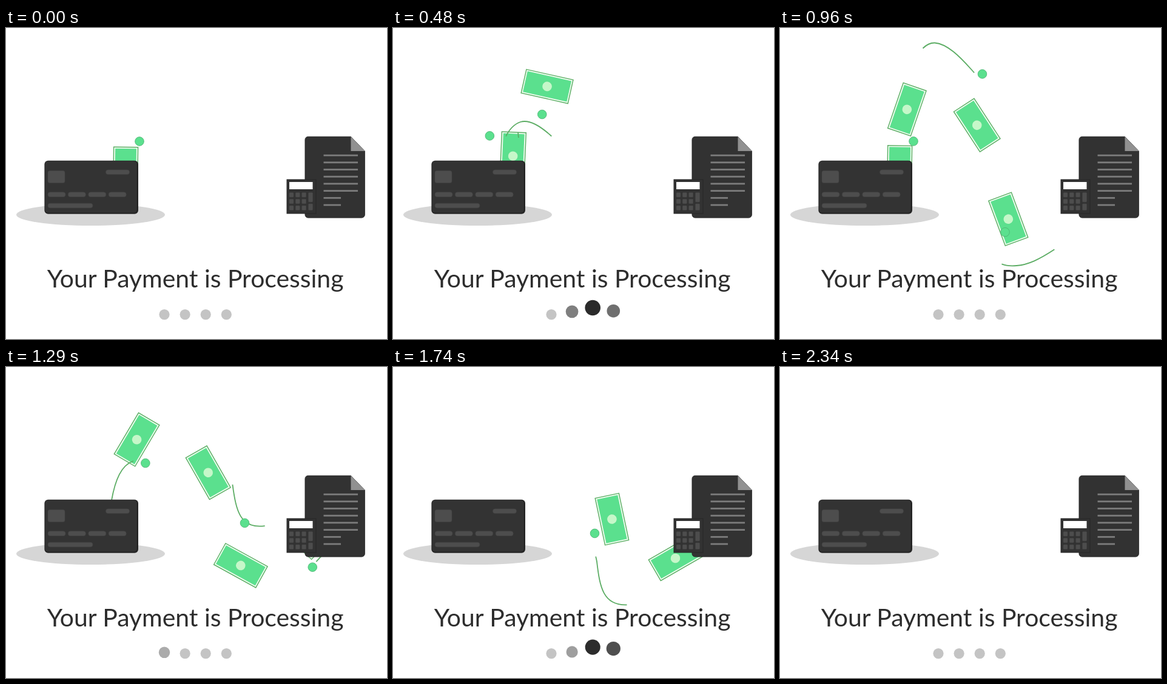
An HTML page for the animation above (2.46 s loop, 628 px wide and 513 px high).

```html
<!DOCTYPE html>
<html lang="en">
<head>
<meta charset="utf-8">
<title>Payment processing</title>
<style>
  html, body { margin: 0; width: 100%; height: 100%; overflow: hidden; background: #fff; }
  svg { display: block; width: 628px; height: 513px; }
  text { font: 40.9px Lato, sans-serif; fill: #2d2d2d; text-anchor: middle; }
  .trail { fill: none; stroke: #5bac63; stroke-width: 1.8; }
  .coin { fill: #5be08e; stroke: #4fb574; stroke-width: .9; }
  .panel { fill: #323232; stroke: #272727; }
  .mark { fill: #4d4d4d; stroke: #444; stroke-width: .6; }
</style>
</head>
<body>
<svg viewBox="0 0 628 513">
  <ellipse cx="139.5" cy="308" rx="122.5" ry="18" fill="#d6d6d6"/>
  <g id="bills"></g>
  <g id="trails"></g>
  <g id="coins"></g>

  <g id="card">
    <rect x="63.4" y="218.8" width="154.6" height="88" rx="6" fill="#262626"/>
    <rect x="64.5" y="219.6" width="151" height="85" rx="5" fill="#333"/>
  </g>

  <g id="paper">
    <path class="panel" d="M498 179.3H568.5L591.3 203V308a5 5 0 0 1-5 5H498a5 5 0 0 1-5-5V184.300a5 5 0 0 1 5-5Z"/>
    <path d="M568.5 179.300V203H591.800Z" fill="#919191"/>
  </g>

  <g id="calc">
    <rect class="panel" x="463" y="250" width="48" height="56"/>
    <rect x="467" y="254" width="38.500" height="12" fill="#fff"/>
  </g>

  <text x="312.1" y="428">Your Payment is Processing</text>
  <g id="dots"></g>
</svg>
<script>
const LOOP = 2460, LAST = 2340, STEP = 30;
const TRIP = 1440, LAG = 150;
const $ = id => document.getElementById(id);
const clamp = p => Math.min(1, Math.max(0, p));

function add(parent, tag, attrs) {
  const el = document.createElementNS('http://www.w3.org/2000/svg', tag);
  for (const k in attrs) el.setAttribute(k, attrs[k]);
  return parent.appendChild(el);
}

// Easing: sine, sine with a late start, and steady speed with soft ends
const sine = p => (1 - Math.cos(Math.PI * p)) / 2;
const late = p => sine(p ** 1.4);
function cruise(p) {
  const ramp = 5 / 24, q = p ** 1.04, edge = Math.min(q, 1 - q);
  if (edge >= ramp) return (q - ramp / 2) / (1 - ramp);
  const s = edge * edge / (2 * ramp * (1 - ramp));
  return q < 0.5 ? s : 1 - s;
}

// A route is a curve and the distance travelled along it
const route = (d, reach, ease, time = TRIP, delay = 0) => {
  const path = add(document.createElementNS('http://www.w3.org/2000/svg', 'g'), 'path', { d });
  return {
    d,
    dist: t => reach * ease(clamp((t - delay) / time)),
    at: s => path.getPointAtLength(Math.max(0, s))
  };
};

const billRoute = route(
  'M197 236C197.5 200 199.7 161 210 132.500C214.5 116 233 92.7 252 96C286.5 102 322 152 338 183' +
  'C361 221 363 281 377 317C384 336 428 340 461 318C478 309 508 288 532 255', 615, cruise);

const low = {
  coin: route('M220 187C222 173 231 148 247 142C272 132 286 180 301.5 212' +
    'C323 254 346 308 373 339C405 384 455 400 500 337L530 298', 486, late),
  trail: route('M171 271Q172 240 174 220C180 186 190 162 210 155C226 150 246 164 264 181' +
    'C295 214 326 270 336 321C341 365 347 396 390 392C420 390 450 368 505 328L540 290',
    616, sine, TRIP - LAG)
};
const high = {
  coin: route('M156 204C158 165 180 93 210 71C246 40 306 42 339 82' +
    'C366 115 382 190 392 251C402 300 440 320 530 280', 657, cruise),
  trail: route('M207 181C203 150 207 105 210.5 86C215 66 230 24 255 24.500C276 26 297 48 315 68' +
    'C347 103 367 140 373 191C379 236 385 268 427 262L560 240', 616, sine, TRIP - LAG, 80)
};

function makeBill() {
  const g = add($('bills'), 'g', {});
  add(g, 'rect', { x: -20, y: -39.5, width: 40, height: 79, fill: '#effcef', stroke: '#5bac63', 'stroke-width': 1.4 });
  add(g, 'rect', { x: -17.4, y: -37, width: 34.8, height: 74, fill: '#5be08e' });
  add(g, 'circle', { r: 7.8, fill: '#c6f7c9' });
  return g;
}

const groups = [low, high, {}, low].map((routes, i) => {
  const g = { ...routes, start: i * 300, bill: makeBill() };
  g.parts = [g.bill];
  if (g.coin) {
    g.coinEl = add($('coins'), 'circle', { class: 'coin', r: 7.3 });
    g.trailEl = add($('trails'), 'path', { class: 'trail', d: g.trail.d });
    g.parts.push(g.coinEl, g.trailEl);
  }
  return g;
});

function bar(id, x, y, width, height, rx) {
  add($(id), 'rect', { class: 'mark', x, y, width, height, rx });
}
bar('card', 69, 235.5, 28, 20, 3);
bar('card', 164.5, 234, 39, 7.5, 3.7);
for (let i = 0; i < 4; i++) bar('card', 69 + i * 33.4, 270.8, 29, 7.8, 3.9);
bar('card', 69, 289.3, 74, 7.5, 3.7);

for (let i = 0; i < 8; i++) {
  add($('paper'), 'rect', {
    x: 523.5, y: 208.7 + i * 11.7, width: i < 6 ? 56.5 : 28.5, height: 2.8, fill: '#7c7c7c'
  });
}
for (let row = 0; row < 3; row++) {
  for (let col = 0; col < 3; col++) bar('calc', 467 + col * 10.3, 271.5 + row * 10.8, 7, 7.5, 1);
}
bar('calc', 498.5, 271.5, 7, 15.5, 1);
bar('calc', 498.5, 290, 7, 10.5, 1);

const dots = Array.from({ length: 4 }, (_, i) => add($('dots'), 'circle', { cx: 261 + i * 34.1 }));

function drawDots(t) {
  dots.forEach((dot, i) => {
    const u = sine(2 * clamp((t % (LOOP / 2) - i * 120) / 465));
    const c = Math.max(43, Math.round(196 - 162 * u));
    dot.setAttribute('cy', 472.6 - 11.2 * u);
    dot.setAttribute('r', 8.6 + 4.2 * u);
    dot.setAttribute('fill', `rgb(${c},${c},${c})`);
  });
}

function drawGroup(g, t) {
  const age = t - g.start, on = age >= 0 && age < TRIP;
  for (const el of g.parts) el.style.display = on ? '' : 'none';
  if (!on) return;

  const s = billRoute.dist(age);
  const p = billRoute.at(s), a = billRoute.at(s - 2), b = billRoute.at(s + 2);
  const turn = Math.atan2(b.x - a.x, a.y - b.y) * 180 / Math.PI;
  g.bill.setAttribute('transform', `translate(${p.x} ${p.y}) rotate(${turn})`);
  if (!g.coin) return;

  const c = g.coin.at(g.coin.dist(age));
  g.coinEl.setAttribute('cx', c.x);
  g.coinEl.setAttribute('cy', c.y);
  const tail = g.trail.dist(age - LAG), head = g.trail.dist(age);
  g.trailEl.setAttribute('stroke-dasharray', `0 ${tail} ${head - tail} 2000`);
}

function draw(ms) {
  const t = Math.min(LAST, Math.floor(ms % LOOP / STEP) * STEP);
  for (const g of groups) drawGroup(g, t);
  drawDots(t);
}

const begin = performance.now();
function tick() {
  draw(performance.now() - begin);
  requestAnimationFrame(tick);
}
tick();
</script>
</body>
</html>
```
